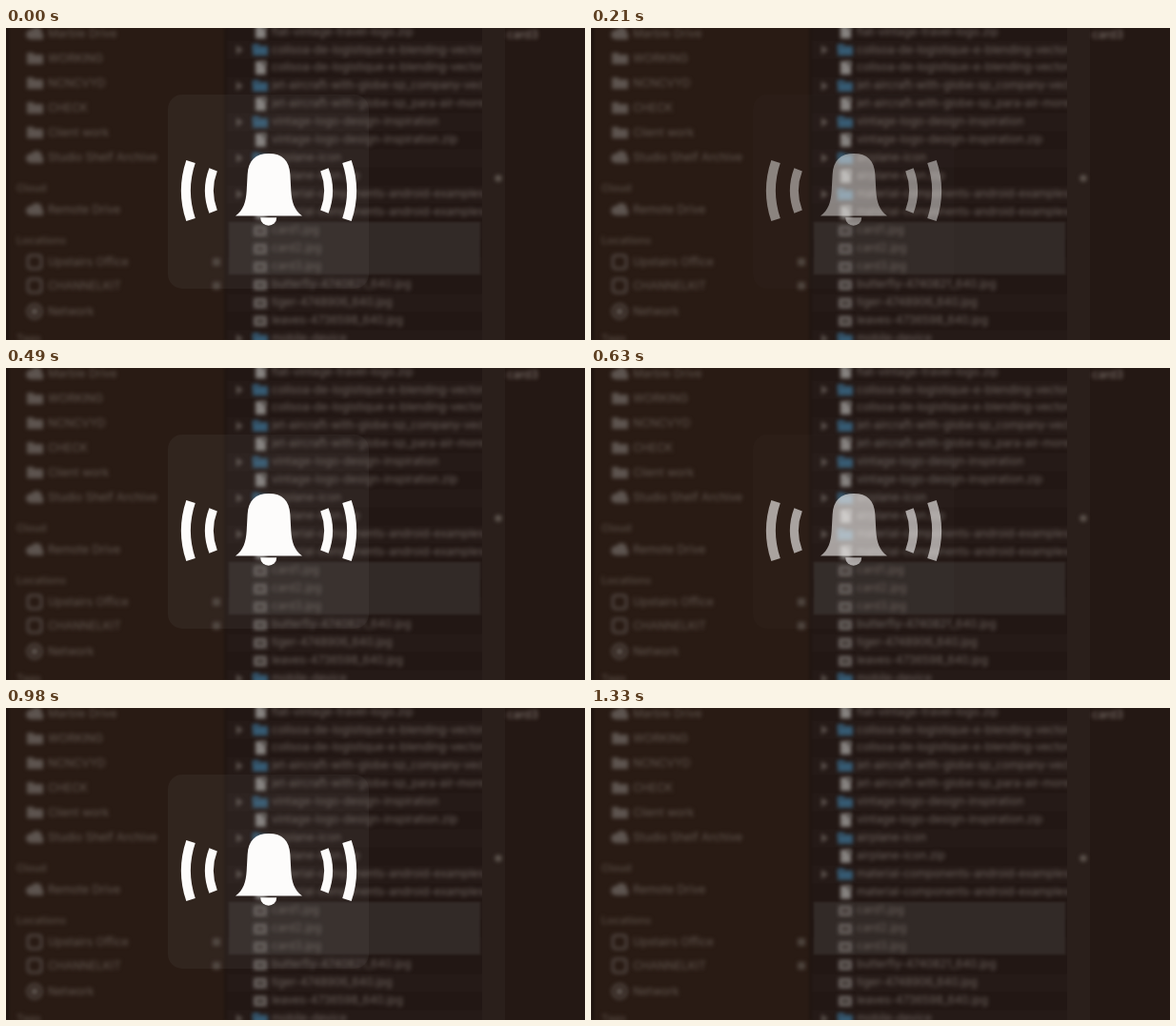
Recreate the animation shown at these times as an HTML page with a canvas. Size 608x328 px, loop 1470 ms.

```html
<!DOCTYPE html>
<html lang="en">
<head>
<meta charset="utf-8">
<title>Bell alert</title>
<style>
html, body { margin: 0; width: 100%; height: 100%; overflow: hidden; background: #261a16; }
canvas { display: block; width: 608px; height: 328px; }
</style>
</head>
<body>
<canvas id="stage" width="608" height="328"></canvas>
<script>
const W = 608, H = 328, LOOP = 1470, STEP = 70;
const ctx = document.getElementById('stage').getContext('2d');
const backdrop = document.createElement('canvas');
backdrop.width = W;
backdrop.height = H;

const sidebar = [
  [6, 'Marble Drive', 'cloud'], [32, 'WORKING', 'folder'], [58, 'NCNCVYD', 'folder'],
  [84, 'CHECK', 'folder'], [110, 'Client work', 'folder'], [136, 'Studio Shelf Archive', 'cloud'],
  [169, 'Cloud'], [191, 'Remote Drive', 'cloud'], [224, 'Locations'],
  [246, 'Upstairs Office', 'device'], [271, 'CHANNELKIT', 'device'],
  [298, 'Network', 'globe'], [327, 'Tags']
];
const files = [
  ['flat-vintage-travel-logo.zip', 'doc'],
  ['colisoa-de-logistique-e-blending-vector', 'folder'],
  ['colisoa-de-logistique-e-blending-vector', 'doc'],
  ['jet-aircraft-with-globe-sp_company-vector', 'folder'],
  ['jet-aircraft-with-globe-sp_para-air-more', 'doc'],
  ['vintage-logo-design-inspiration', 'folder'],
  ['vintage-logo-design-inspiration.zip', 'doc'],
  ['airplane-icon', 'folder'], ['airplane-icon.zip', 'doc'],
  ['material-components-android-examples', 'folder'],
  ['material-components-android-examples', 'doc'],
  ['card1.jpg', 'image'], ['card2.jpg', 'image'], ['card3.jpg', 'image'],
  ['butterfly-4740821_640.jpg', 'image'], ['tiger-4748906_640.jpg', 'image'],
  ['leaves-4736598_640.jpg', 'image'], ['mobile-device', 'folder']
];

function rect(g, color, x, y, w, h) {
  g.fillStyle = color;
  g.fillRect(x, y, w, h);
}

function label(g, text, x, y, color, size, weight = 400) {
  g.font = `${weight} ${size}px Inter, "Open Sans", sans-serif`;
  g.fillStyle = color;
  g.fillText(text, x, y);
}

function placeIcon(g, kind, x, y) {
  g.fillStyle = g.strokeStyle = '#5d544f';
  g.lineWidth = 2;
  g.beginPath();
  if (kind === 'folder') {
    g.rect(x - 8, y - 6, 7, 4);
    g.rect(x - 8, y - 4, 17, 10);
    g.fill();
  } else if (kind === 'cloud') {
    g.arc(x - 4, y + 1, 5, 0, 7);
    g.arc(x + 2, y - 1, 6, 0, 7);
    g.rect(x - 5, y, 14, 6);
    g.fill();
  } else if (kind === 'device') {
    g.roundRect(x - 7, y - 7, 14, 14, 3);
    g.stroke();
  } else {
    g.arc(x, y, 7.5, 0, 7);
    g.stroke();
    g.beginPath();
    g.arc(x, y, 4, 0, 7);
    g.fill();
  }
}

function fileIcon(g, kind, x, y) {
  if (kind === 'folder') {
    rect(g, '#31526a', x - 8, y - 6, 7, 4);
    rect(g, '#365a72', x - 8, y - 4, 16, 10);
  } else if (kind === 'doc') {
    rect(g, '#878380', x - 5, y - 7, 11, 14);
    rect(g, '#4b4542', x + 2, y - 7, 4, 4);
  } else {
    rect(g, '#69625f', x - 7, y - 5, 14, 11);
    rect(g, '#423a36', x - 4, y - 2, 8, 5);
  }
}

function paintBackdrop() {
  const g = backdrop.getContext('2d');
  g.textBaseline = 'middle';
  rect(g, '#291b14', 0, 0, W, H);
  rect(g, '#251a17', 231, 0, 269, H);
  for (let i = 0; i < files.length; i += 2) rect(g, '#221714', 231, i * 19 - 5.5, 269, 19);
  rect(g, '#2a1f1b', 500, 0, 24, H);
  rect(g, '#241814', 524, 0, W - 524, H);
  g.filter = 'blur(1px)';
  rect(g, '#322a27', 234, 204, 264, 55);
  rect(g, '#211612', 229, 0, 3, H);
  rect(g, '#1e1410', 0, 0, 3, H);

  g.filter = 'blur(2px)';
  for (const [y, text, kind] of sidebar) {
    if (kind) {
      placeIcon(g, kind, 30, y);
      label(g, text, 44, y, '#625750', 12);
    } else {
      label(g, text, 11, y, '#53473f', 11, 600);
    }
  }
  for (const y of [246, 271]) rect(g, '#4d433d', 217, y - 4, 8, 8);

  g.save();
  g.beginPath();
  g.rect(231, 0, 269, H);
  g.clip();
  files.forEach(([text, kind], i) => {
    const y = 4 + i * 18.98;
    fileIcon(g, kind, 267, y);
    label(g, text, 279, y, '#6c625d', 11.7);
    if (kind !== 'folder') return;
    g.fillStyle = '#5c534e';
    g.beginPath();
    g.moveTo(242, y - 5);
    g.lineTo(249, y);
    g.lineTo(242, y + 5);
    g.fill();
  });
  g.restore();

  label(g, 'card3', 526, 7, '#887d77', 12);
  g.fillStyle = '#625953';
  g.beginPath();
  g.arc(517, 158, 3.5, 0, 7);
  g.fill();
}

function wave(cx, r, width, spread) {
  ctx.lineWidth = width;
  ctx.beginPath();
  ctx.arc(cx, 171, r, Math.PI - spread, Math.PI + spread);
  ctx.stroke();
}

function drawBell() {
  ctx.fillStyle = ctx.strokeStyle = '#fdfcfb';
  ctx.fill(new Path2D('M241 197.5C249 192 252 183 252.7 171L253.6 154' +
    'C254.5 139 262 132 276 132C290 132 297.5 139 298.4 154' +
    'L299.3 171C300 183 303 192 311 197.5Z'));
  ctx.beginPath();
  ctx.arc(275.7, 199.3, 8.5, 0, Math.PI);
  ctx.fill();
  for (const side of [1, -1]) {
    ctx.save();
    ctx.translate(276, 0);
    ctx.scale(side, 1);
    wave(8, 95, 10, 0.327);
    wave(-1, 61.5, 9, 0.367);
    ctx.restore();
  }
}

// Three pulses, each fading in held steps; the middle one ends sooner.
const fade = [1, 0.82, 0.6, 0.46, 0.22];
function opacity(t) {
  const pulse = Math.floor(t / 490);
  const step = Math.floor((t - pulse * 490) / STEP);
  return pulse === 1 && step > 3 ? 0 : fade[step] || 0;
}

function draw(t) {
  ctx.globalAlpha = 1;
  ctx.drawImage(backdrop, 0, 0);
  const a = opacity(t);
  if (!a) return;
  ctx.globalAlpha = a * a;
  ctx.fillStyle = 'rgba(135, 130, 130, 0.09)';
  ctx.beginPath();
  ctx.roundRect(170, 70, 211, 204, 15);
  ctx.fill();
  ctx.globalAlpha = a;
  drawBell();
}

const start = performance.now();
function tick() {
  draw((performance.now() - start) % LOOP);
  requestAnimationFrame(tick);
}
paintBackdrop();
tick();
</script>
</body>
</html>
```
